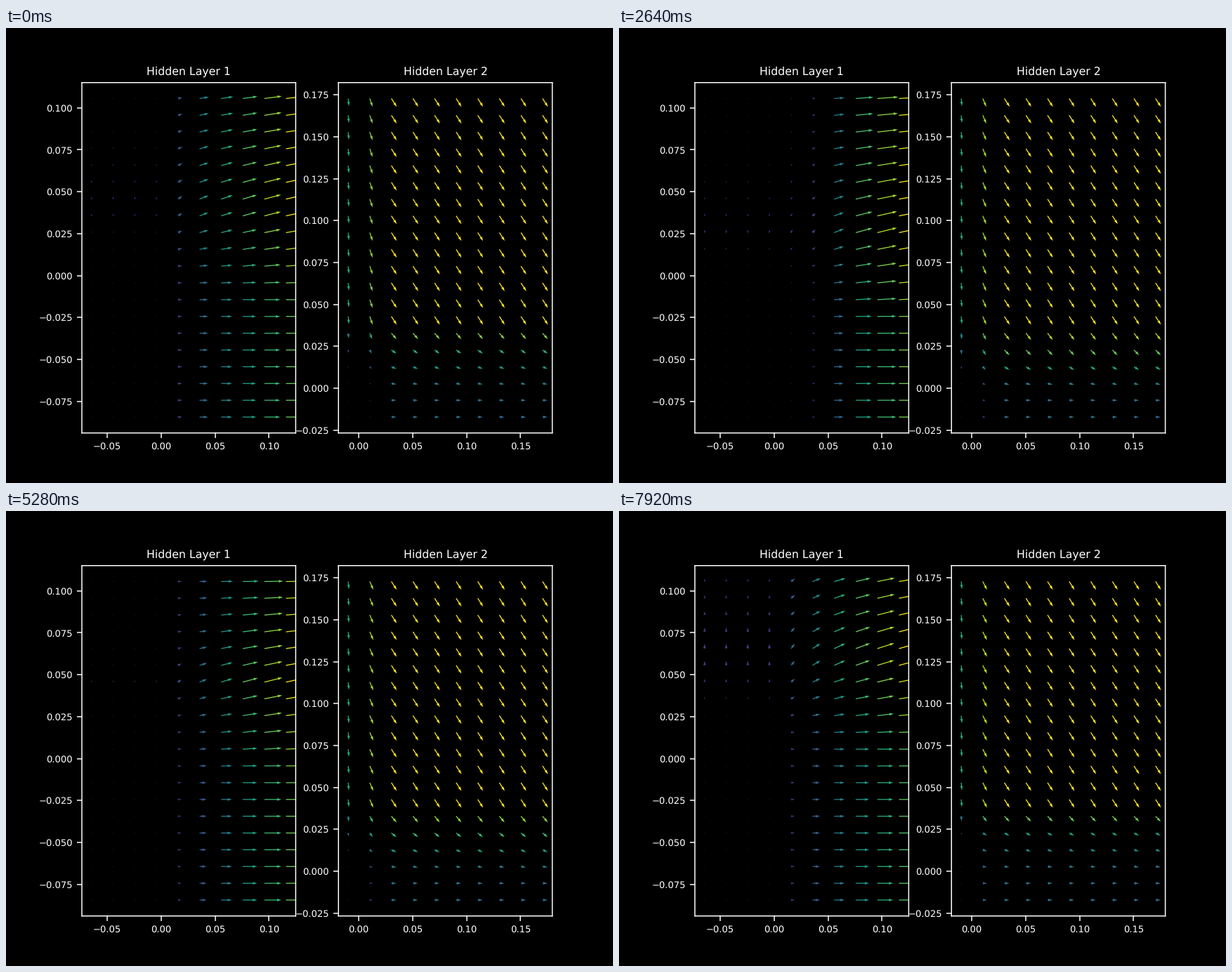
These frames come from a looping animation (864 by 648 pixels, 8000 ms). A matplotlib script:

```python
import numpy as np
import matplotlib.pyplot as plt
from matplotlib.animation import FuncAnimation
from matplotlib.ticker import MultipleLocator

plt.style.use("dark_background")
plt.rcParams.update({
    "font.family": "DejaVu Sans",
    "font.size": 7,
    "text.hinting": "none",
    "path.snap": False,
})

STEP_MS, TICK_MS, LOOP_MS = 330, 80, 8000
COL = np.arange(10)[None, :]
ROW = np.arange(20)[:, None]      # counted from the top

# Key points over the training steps; arrow sizes are in pixels
KEY_STEPS = [0, 5, 8, 11, 16, 21, 24]
KEYS = {
    "near": [12, 7, 4, 9.5, 10, 6, 10.5],          # pull in column 5
    "reach": [26, 25.5, 31, 28, 28, 32, 26],       # pull in the last column
    "top": [3.3, 6.5, 2.2, 2.5, 0.5, 2.8, 5],      # lift in the first row
    "peak": [6.5, 10, 6.8, 7.5, 6.3, 4.3, 8],      # greatest lift
    "peak_row": [6.5, 5.5, 8, 4.5, 6, 3, 4.5],
    "floor": [2.4, 0.8, 2.5, 1.5, 3.5, 2, 1],      # lift lost on the left
    "fall": [5.2, 6.6, 7.6, 7, 6, 7, 3.8],         # drop in row 15
    "second": [4, 5.6, 5, 4, 5, 5.6, 6],           # pull in column 1
}
FULL_FALL = 11.8


def layer_one(k):
    pull = np.interp(COL, [3, 5, 7, 9],
                     [0, k["near"], 0.73 * k["reach"], k["reach"]])
    u = pull * (1 + 0.1 * np.clip(1 - ROW / 12, 0, 1))
    right = np.interp(ROW, [0, k["peak_row"], k["peak_row"] + 5.2],
                      [k["top"], k["peak"], 0])
    left = np.maximum(0, right - k["floor"])
    mix = np.clip(pull / pull[0, 8], 0, 1)
    return u, left + (right - left) * mix


def layer_two(k):
    fall = np.interp(ROW, [13, 15, 17.5], [FULL_FALL, k["fall"], 0])
    part = fall / FULL_FALL
    low = 2 * k["second"] - 6
    u = np.where(COL == 0, part,
                 np.where(COL == 1, low + (k["second"] - low) * part,
                          7 + 0.6 * part))
    v = -np.where(COL == 0, np.maximum(0, fall - 1), fall)
    return u, v


def make_panel(ax, title, x0, y0):
    x = x0 + 0.02 * COL
    y = y0 + 0.01 * ROW[::-1]
    zero = np.zeros((ROW.size, COL.size))
    arrows = ax.quiver(x + zero, y + zero, zero, zero, zero, cmap="viridis",
                       scale=ax.bbox.width, scale_units="width")
    ax.set_title(title)
    ax.set_xlim(x.min() - 0.009, x.max() + 0.009)
    ax.set_ylim(y.min() - 0.0095, y.max() + 0.0095)
    ax.xaxis.set_major_locator(MultipleLocator(0.05))
    ax.yaxis.set_major_locator(MultipleLocator(0.025))
    return arrows


fig, axes = plt.subplots(1, 2, figsize=(6.4, 4.8), dpi=135)
panels = [
    (make_panel(axes[0], "Hidden Layer 1", -0.0643, -0.0844), layer_one),
    (make_panel(axes[1], "Hidden Layer 2", -0.0096, -0.0172), layer_two),
]


def update(i):
    step = (i * TICK_MS + TICK_MS - 1) // STEP_MS
    k = {name: np.interp(step, KEY_STEPS, vals) for name, vals in KEYS.items()}
    for arrows, field in panels:
        u, v = field(k)
        strength = np.abs(u) + np.abs(v)
        arrows.set_UVC(u, v, strength)
        arrows.set_clim(strength.min(), strength.max())
    return [arrows for arrows, _ in panels]


anim = FuncAnimation(fig, update, frames=LOOP_MS // TICK_MS,
                     interval=TICK_MS, repeat=True, repeat_delay=0)
plt.show()
```
